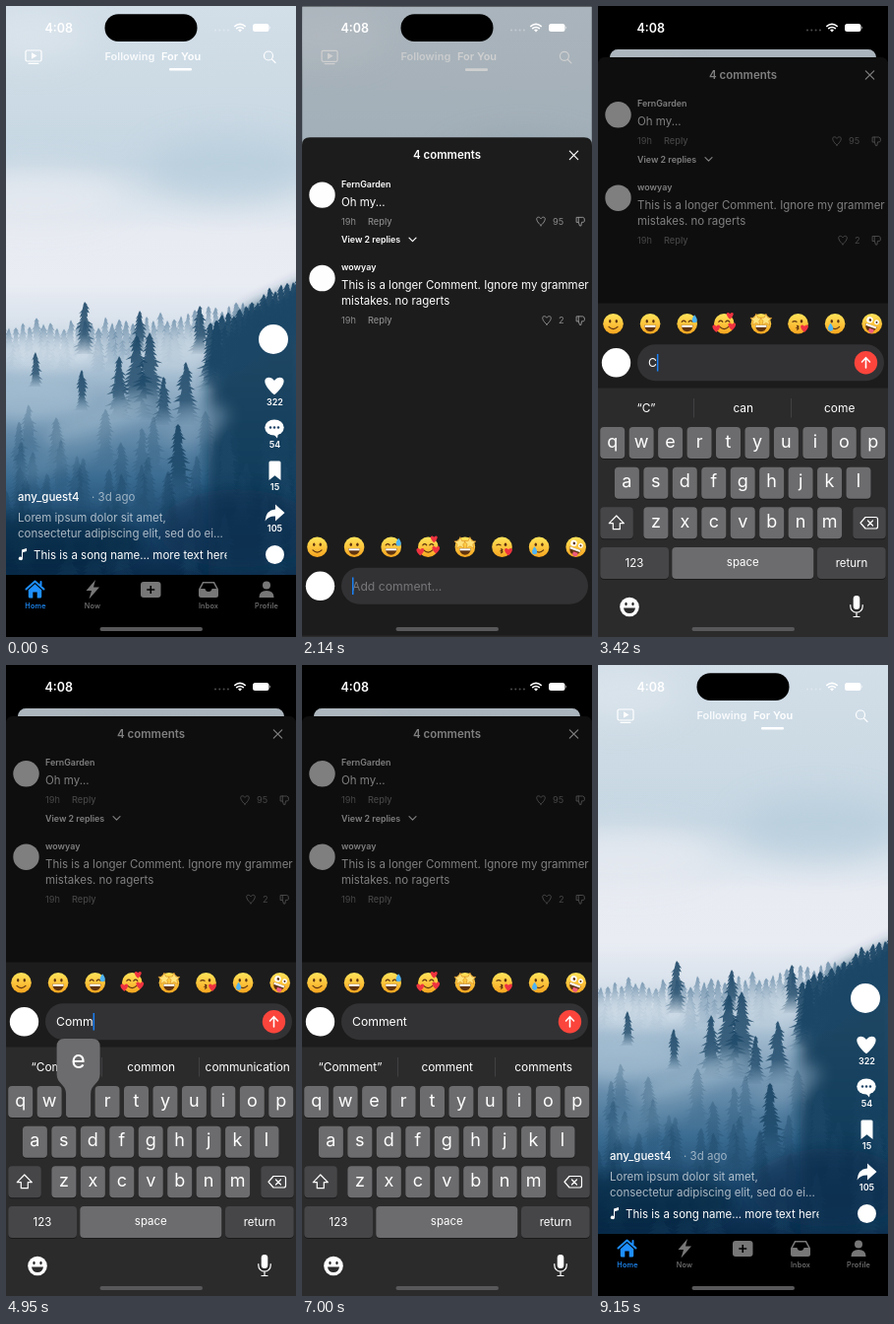
An HTML page for the animation above (9.17 s loop, 295 by 640 pixels).

```html
<!DOCTYPE html>
<html lang="en">
<head>
<meta charset="utf-8">
<title>Comment sheet</title>
<style>
html, body { margin: 0; width: 100%; height: 100%; overflow: hidden; background: #000; }
svg { display: block; width: 100vw; height: 100vh; }
text { font-family: Inter, "Open Sans", sans-serif; font-size: 11.5px; fill: #fff; white-space: pre; }
.b { font-weight: 600; }
.mid { text-anchor: middle; }
.top { font-size: 11px; font-weight: 600; }
.name { font-size: 8.9px; font-weight: 600; }
.meta { font-size: 9.2px; fill: #8a8a8a; }
.count { font-size: 9px; font-weight: 600; text-anchor: middle; }
.tab { font-size: 7.3px; font-weight: 500; letter-spacing: .2px; text-anchor: middle; fill: #777; }
.line { fill: none; stroke: #fff; stroke-width: 1.2; stroke-linecap: round; stroke-linejoin: round; }
.gray { stroke: #9a9a9a; stroke-width: .9; }
.input { font-size: 12.2px; }
.word { font-size: 11.9px; text-anchor: middle; }
.lower { font-size: 18px; text-anchor: middle; }
.upper { font-size: 16px; text-anchor: middle; }
.face { fill: none; stroke: #5f3410; stroke-width: 1.2; stroke-linecap: round; }
.ink { fill: #5f3410; }
</style>
</head>
<body>
<svg viewBox="0 0 295 640" preserveAspectRatio="none">
  <defs>
    <linearGradient id="sky" x2="0" y2="1">
      <stop offset="0" stop-color="#d2dee8"/><stop offset=".12" stop-color="#cddbe5"/>
      <stop offset=".25" stop-color="#c6d7e3"/><stop offset=".31" stop-color="#d9e3ec"/>
      <stop offset=".36" stop-color="#e8ebf2"/><stop offset=".44" stop-color="#e9ecf3"/>
      <stop offset=".5" stop-color="#d9e2ec"/><stop offset=".57" stop-color="#aec4d6"/>
      <stop offset=".66" stop-color="#7195b2"/><stop offset=".75" stop-color="#396a90"/>
      <stop offset=".83" stop-color="#1a466b"/><stop offset=".9" stop-color="#0a2b4b"/>
    </linearGradient>
    <linearGradient id="farTree" x2="0" y2="1">
      <stop offset="0" stop-color="#5b819f"/><stop offset="1" stop-color="#5b819f" stop-opacity="0"/>
    </linearGradient>
    <linearGradient id="nearTree" x2="0" y2="1">
      <stop offset="0" stop-color="#1b4666"/><stop offset=".6" stop-color="#1b4666" stop-opacity=".85"/>
      <stop offset="1" stop-color="#1b4666" stop-opacity="0"/>
    </linearGradient>
    <linearGradient id="skin" x2="0" y2="1">
      <stop offset="0" stop-color="#ffe45a"/><stop offset="1" stop-color="#f8a51f"/>
    </linearGradient>
    <filter id="soft" x="-60%" y="-60%" width="220%" height="220%"><feGaussianBlur stdDeviation="15"/></filter>
    <filter id="haze" x="-60%" y="-60%" width="220%" height="220%"><feGaussianBlur stdDeviation="8"/></filter>
    <clipPath id="card"><rect id="cardShape" width="295" height="640"/></clipPath>
    <clipPath id="songClip"><rect x="12" y="545" width="212.5" height="24"/></clipPath>
    <path id="heart" d="M0 4.2C-5 -.2 -5.3 -4 -2.6 -4.2C-1 -4.3 0 -2.6 0 -2.6S1 -4.3 2.6 -4.2C5.3 -4 5 -.2 0 4.2z"/>
    <path id="thumb" d="M-4-4h6.3q2 .1 1.6 3.7l-.8 1.2H1L.4 4.6H-1L-2.2 1H-4zM-2.2-4v5"/>
  </defs>

  <g id="feed" clip-path="url(#card)">
    <rect width="295" height="640" fill="url(#sky)"/>
    <g filter="url(#soft)">
      <ellipse cx="225" cy="165" rx="80" ry="32" fill="#b7cddc" opacity=".7"/>
      <ellipse cx="30" cy="195" rx="90" ry="28" fill="#e6eaf1" opacity=".8"/>
      <ellipse cx="25" cy="30" rx="60" ry="26" fill="#e0e8ef" opacity=".6"/>
    </g>
    <g id="forest"></g>
    <rect y="577" width="295" height="63"/>
    <path class="line" d="M21.5 45h13q1.5 0 1.5 1.5v8q0 1.500-1.5 1.5h-13q-1.5 0-1.5-1.5v-8q0-1.5 1.5-1.5zM23 58.300h10"/>
    <path d="M26 47.300l5.5 3.200-5.5 3.200z" fill="#fff"/>
    <text class="top" x="100.5" y="55" opacity=".85">Following</text>
    <text class="top" x="158" y="55">For You</text>
    <rect x="166" y="63" width="23" height="2.6" rx="1" fill="#fff"/>
    <path class="line" d="M271.5 50.500a4.5 4.5 0 1 1-9 0a4.5 4.5 0 1 1 9 0M270.400 53.900l3.6 3.6"/>

    <g fill="#fff">
      <circle cx="272" cy="338" r="15"/>
      <use href="#heart" transform="translate(273 385.5) scale(2.25 2.1)"/>
      <ellipse cx="273" cy="427.5" rx="9.7" ry="8"/><path d="M272 434l5-1.500-1 6z"/>
      <path d="M267.5 463q0-1.5 1.5-1.500h9q1.5 0 1.5 1.500v18l-6-4.800-6 4.800z"/>
      <path d="M274 505.500l9.5 8.500-9.5 8.500v-5q-6.500-.5-10.5 5 .8-11.5 10.5-12z"/>
      <circle cx="273.5" cy="556.5" r="9.5"/>
    </g>
    <g fill="#1d4365"><circle cx="269" cy="427.5" r="1.2"/><circle cx="273" cy="427.5" r="1.2"/><circle cx="277" cy="427.5" r="1.2"/></g>
    <text class="count" x="273.5" y="405.3">322</text>
    <text class="count" x="273.5" y="448.3">54</text>
    <text class="count" x="273.5" y="491.3">15</text>
    <text class="count" x="273.5" y="533.3">105</text>
    <text x="12" y="502" font-weight="500">any_guest4</text>
    <text x="87" y="502" opacity=".55">· 3d ago</text>
    <text x="12" y="522.5" opacity=".65">Lorem ipsum dolor sit amet,</text>
    <text x="12" y="538.5" opacity=".65">consectetur adipiscing elit, sed do ei...</text>
    <path d="M16 551.500l5-1.500v3l-4 1.200v6.300a2.100 1.700 0 1 1-1-1.500z" fill="#fff"/>
    <text x="28" y="560.5" clip-path="url(#songClip)">This is a song name... more text here</text>

    <path d="M20.500 591.500l9-8 9 8M35.5 584v4" fill="none" stroke="#1e8fff" stroke-width="2" stroke-linecap="round" stroke-linejoin="round"/>
    <path d="M22.800 592.300l6.700-6 6.700 6v6.700q0 1.500-1.500 1.500h-3v-6h-4.400v6h-3q-1.500 0-1.500-1.500z" fill="#1e8fff"/>
    <g fill="#777">
      <path d="M91 582l-9.5 11h5.5l-2.5 8.500 10.5-12h-6z"/>
      <rect x="137" y="584" width="20.5" height="16" rx="3"/>
      <circle cx="265" cy="587.5" r="4"/><path d="M257.5 600q0-7 7.5-7t7.5 7z"/>
      <path d="M200 584h12l4 7.500v6q0 2.500-2.500 2.500h-15q-2.500 0-2.500-2.500v-6zM201 585.500l-3 5.500h4.500q.5 3 3.500 3t3.500-3h4.500l-3-5.500z" fill-rule="evenodd"/>
    </g>
    <path d="M147.250 588v8m-4-4h8" stroke="#000" stroke-width="1.6"/>
    <text class="tab" x="30" y="610.8" style="fill:#1e8fff">Home</text>
    <text class="tab" x="88" y="610.8">Now</text>
    <text class="tab" x="206" y="610.8">Inbox</text>
    <text class="tab" x="265" y="610.8">Profile</text>
    <rect id="feedDim" width="295" height="640"/>
  </g>

  <rect x="100.5" y="8.3" width="94" height="27.7" rx="13.8"/>
  <text class="b" x="39.5" y="26.5" style="font-size:12.5px">4:08</text>
  <g fill="#fff">
    <g opacity=".3"><circle cx="213" cy="24.5" r="1"/><circle cx="217.3" cy="24.5" r="1"/><circle cx="221.6" cy="24.5" r="1"/><circle cx="225.9" cy="24.5" r="1"/></g>
    <rect x="251" y="18" width="16.5" height="8" rx="2.5"/><path d="M268.5 20.500q1.5 1.500 0 3z"/>
    <path d="M238 26.500l-2-2.200q2-1.500 4 0z"/>
  </g>
  <path class="line" style="stroke-width:1.6;stroke-linecap:butt" d="M232.300 20.800q5.700-4.700 11.400 0M234.200 23q3.800-3 7.600 0"/>

  <g id="sheet">
    <path d="M0 700V8q0-8 8-8h279q8 0 8 8v692z" fill="#1c1c1c"/>
    <text class="b mid" x="147.5" y="22">4 comments</text>
    <path class="line" d="M272.300 13.800l8.400 8.400m0-8.400l-8.400 8.400"/>
    <g fill="#fff"><circle cx="20.5" cy="58.3" r="13.2"/><circle cx="20.5" cy="142.7" r="13.2"/></g>
    <text class="name" x="40" y="50.2">FernGarden</text>
    <text x="40" y="69.2">Oh my...</text>
    <text class="name" x="40" y="106.5">View 2 replies</text>
    <path class="line" d="M109 101.700l3.500 3.500 3.500-3.500"/>
    <text class="name" x="40" y="134.7">wowyay</text>
    <text x="40" y="153.7">This is a longer Comment. Ignore my grammer</text>
    <text x="40" y="169.7">mistakes. no ragerts</text>
    <g id="metas"></g>
    <path id="listDim" d="M0 700V8q0-8 8-8h279q8 0 8 8v692z"/>
  </g>

  <g id="bar">
    <rect y="528" width="295" height="400" fill="#1c1c1c"/>
    <g id="emojis"></g>
    <circle cx="18.5" cy="588.3" r="14.7" fill="#fff"/>
    <rect x="40" y="569.7" width="251" height="37" rx="18.5" fill="#323234"/>
    <text id="hint" class="input" x="51" y="592.5" style="fill:#77777b">Add comment...</text>
    <text id="typed" class="input" x="51" y="592.5"></text>
    <rect id="cursor" y="579.5" width="1.5" height="17.5" fill="#1a80f5"/>
    <g id="send"><circle cx="272.5" cy="588.3" r="11.7" fill="#fb453c"/>
      <path class="line" style="stroke-width:1.6" d="M272.5 593.500v-10m-4 4l4-4.300 4 4.300"/></g>
  </g>

  <g id="keyboard">
    <rect y="387.5" width="295" height="253" fill="#2b2b2c"/>
    <path d="M97.5 398v19.500M196.5 398v19.500" stroke="#48484a" stroke-width=".8"/>
    <text class="word" x="49" y="411.5"></text>
    <text class="word" x="147.7" y="411.5"></text>
    <text class="word" x="245.7" y="411.5"></text>
    <g id="keys"></g>
    <g id="lowerKeys"></g>
    <g id="upperKeys"></g>
    <path id="shift" class="line" d="M18.800 517l7.500 7.700h-4v6h-7v-6h-4z"/>
    <path class="line" d="M272 518.500h10.500q2 0 2 2v7.500q0 2-2 2H272l-5-5.750zM274.500 522l5 5m0-5l-5 5"/>
    <text class="mid" x="37" y="569">123</text>
    <text class="mid" x="147.3" y="568">space</text>
    <text class="mid" x="258" y="569">return</text>
    <circle cx="32" cy="609.5" r="9.8" fill="#fff"/>
    <g fill="#2b2b2c"><ellipse cx="28.5" cy="606.5" rx="1.2" ry="1.8"/><ellipse cx="35.5" cy="606.5" rx="1.2" ry="1.8"/><path d="M26 610.500h12q-1 5.500-6 5.500t-6-5.500z"/></g>
    <rect x="259.7" y="598" width="6.6" height="14" rx="3.3" fill="#fff"/>
    <path class="line" d="M256.800 607.500v1.500a6.200 6.200 0 0 0 12.400 0v-1.500M263 615.500v4m-3 0h6"/>
    <g id="popup">
      <path fill="#6c6c6e" d="M-22-40q0-8 8-8h28q8 0 8 8v28c0 10-9.500 10-9.500 20v20q0 4-4 4h-17q-4 0-4-4v-20c0-10-9.500-10-9.500-20z"/>
      <text id="popupText" class="mid" y="-18" style="font-size:25px"></text>
    </g>
  </g>
  <rect x="95.5" y="630" width="104.5" height="4" rx="2" fill="#58585a"/>
</svg>

<script>
const LOOP = 9170;
const $ = id => document.getElementById(id);
const add = (id, markup) => $(id).insertAdjacentHTML("beforeend", markup);
const show = (id, on) => $(id).setAttribute("display", on ? "inline" : "none");
const shift = (id, x, y, rest = "") => $(id).setAttribute("transform", `translate(${x} ${y}) ${rest}`);

// Misty forest
let seed = 11;
const rand = () => (seed = seed * 16807 % 2147483647) / 2147483647;

function tree(x, top, h, fill, alpha) {
  const rows = Math.max(6, Math.round(h / 4)), left = [], right = [];
  for (let i = 1; i <= rows; i++) {
    const y = top + h * i / rows, w = h * .23 * Math.pow(i / rows, .55);
    const r = w * (.5 + .7 * rand()), l = w * (.5 + .7 * rand());
    right.push(`${x + r} ${y}`, `${x + r * .5} ${y - 1}`);
    left.unshift(`${x - l * .5} ${y - 1}`, `${x - l} ${y + rand()}`);
  }
  add("forest", `<path d="M${x} ${top}L${right.join("L")}L${left.join("L")}z" fill="${fill}" opacity="${alpha}"/>`);
}
function mist(x, y, rx, ry, color, alpha, turn = 0) {
  add("forest", `<ellipse rx="${rx}" ry="${ry}" fill="${color}" opacity="${alpha}" filter="url(#haze)" transform="translate(${x} ${y}) rotate(${turn})"/>`);
}
const far = "url(#farTree)", near = "url(#nearTree)";
for (let x = -4; x < 300; x += 7) tree(x, 314 - 30 * (x / 295) ** 3 + 14 * rand(), 34 + 14 * rand(), far, .75);
add("forest", '<path d="M206 577V385Q218 335 248 308L310 278V577z" fill="#103857" opacity=".9" filter="url(#haze)"/>');
mist(40, 350, 60, 16, "#dbe5ee", .7);
mist(172, 348, 32, 18, "#c6d5e1", .7);
for (let x = 208; x < 300; x += 6) tree(x, 318 - 48 * (x - 208) / 87 + 10 * rand(), 70, near, .95);
mist(25, 400, 60, 22, "#a9c2d5", .6);
[[80, 300, 54], [136, 309, 44], [30, 351, 36], [214, 319, 70], [197, 304, 50], [115, 355, 66], [133, 334, 85],
 [146, 331, 90], [77, 369, 42], [183, 361, 65], [160, 376, 50]].forEach(([x, y, h]) => tree(x, y, h, near, .9));
mist(195, 425, 34, 16, "#7f9fb8", .55, -25);
mist(95, 420, 60, 13, "#9cb8cc", .65, -20);
for (let i = 0; i < 60; i++) {
  const d = i / 60;
  tree(rand() * 300, 400 + 125 * d + 20 * rand(), 60, near, .25 + .3 * d);
}
tree(175, 424, 80, near, .95);
tree(225, 430, 80, near, .95);
mist(60, 455, 55, 12, "#6f95b1", .45, -25);
mist(30, 545, 110, 30, "#06203a", .55);
mist(235, 530, 80, 40, "#0a2b4b", .5);

// Comment footers
[[85, 243, "95"], [185.5, 249, "2"]].forEach(([y, x, likes]) => add("metas", `
  <text class="meta" x="40" y="${y + 3.3}">19h</text><text class="meta" x="67" y="${y + 3.3}" font-weight="500">Reply</text>
  <use href="#heart" class="line gray" transform="translate(${x} ${y})"/>
  <text class="meta" x="${x + 12}" y="${y + 3.3}">${likes}</text>
  <use href="#thumb" class="line gray" transform="translate(283.5 ${y})"/>`));

// Emoji row
const eyes = '<ellipse class="ink" cx="-3.3" cy="-2.5" rx="1.2" ry="1.8"/><ellipse class="ink" cx="3.3" cy="-2.5" rx="1.2" ry="1.8"/>';
const shutEyes = '<path class="face" d="M-5.500-2q2-2.500 4 0M1.500-2q2-2.500 4 0"/>';
const smile = '<path class="face" d="M-4.500 3q4.500 4.500 9 0"/>';
const grin = '<path class="ink" d="M-6 1.500h12q-1 6.500-6 6.500t-6-6.500z"/><path d="M-5.500 1.500h11v2h-11z" fill="#fff"/>';
const love = (x, y, s) => `<use href="#heart" fill="#ef3340" transform="translate(${x} ${y}) scale(${s})"/>`;
const star = x => `<path transform="translate(${x} -4) scale(1.25)" fill="#ffe27a" stroke="#d98a1c" stroke-width=".5" d="M0-5l1.400 3.200 3.400.3-2.500 2.300.8 3.500L0 2.500l-3.100 1.800.8-3.500-2.500-2.300 3.400-.3z"/>`;
const drop = (x, y) => `<path transform="translate(${x} ${y})" fill="#4fb4f2" d="M0-4q3 4 2.500 5.500a2.500 2.500 0 0 1-5 0Q-3 0 0-4z"/>`;
[
  eyes + smile,
  eyes + grin,
  shutEyes + grin + drop(7.5, -5),
  shutEyes + smile + love(-8, 5, .9) + love(8, 3, .9) + love(6, -8, .8),
  star(-5) + star(5) + grin,
  '<path class="face" d="M-5.500-2q2-1.500 4 0M-1 2q3 .5 0 2 3 .5 0 2"/><ellipse class="ink" cx="3.5" cy="-2.5" rx="1.3" ry="1.8"/>' + love(6.5, 5, .9),
  eyes + smile + drop(-4.5, 3.5),
  '<g transform="rotate(20)"><circle cx="-3.5" cy="-3" r="3.2" fill="#fff"/><circle cx="4" cy="-3" r="2.4" fill="#fff"/><circle class="ink" cx="-3" cy="-3" r="1.3"/><circle class="ink" cx="4" cy="-3" r="1"/>' + grin + '<path d="M-1 5h5v3q-2.500 3-5 0z" fill="#ee5b7c"/></g>'
].forEach((face, i) => add("emojis",
  `<g transform="translate(${15.5 + 37.6 * i} 548.8)"><circle r="10.3" fill="url(#skin)"/>${face}</g>`));

// Keyboard
const keyPos = {};
const key = (x, y, w, fill, id = "") => add("keys",
  `<rect x="${x}" y="${y + 1}" width="${w}" height="32" rx="4" fill="#1b1b1c"/><rect id="${id}" x="${x}" y="${y}" width="${w}" height="32" rx="4" fill="${fill}"/>`);
[["qwertyuiop", 14.7, 427], ["asdfghjkl", 29.4, 467.7], ["zxcvbnm", 58.9, 508.3]].forEach(([row, start, y]) =>
  [...row].forEach((c, i) => {
    const x = start + 29.45 * i;
    keyPos[c] = [x, y];
    key(x - 12.5, y, 25, "#6c6c6e");
    add("lowerKeys", `<text class="lower" x="${x}" y="${y + 20.7}">${c}</text>`);
    add("upperKeys", `<text class="upper" x="${x}" y="${y + 21.8}">${c.toUpperCase()}</text>`);
  }));
key(2.3, 508.3, 33.5, "#464648", "shiftKey");
key(259.3, 508.3, 33.5, "#464648");
key(2.3, 549, 69.7, "#464648");
key(75.3, 549, 144, "#6c6c6e");
key(223, 549, 69.7, "#464648");

// Each press: letter, finger down, finger up (ms)
const presses = [["C", 3060, 3200], ["o", 3540, 3650], ["m", 3990, 4120], ["m", 4480, 4600],
  ["e", 4840, 5060], ["n", 5660, 5780], ["t", 6350, 6470]];
const guesses = [["I", "The", "I’m"], ["can", "come"], ["could", "come"], ["come", "coming"],
  ["common", "communication"], ["comment", "comments"]];
const words = document.querySelectorAll(".word");

// Remaining share (1 to 0) of a critically damped spring, held between steps
function remaining(t, from, to, step, lead, speed, gap = step) {
  if (t < from) return 1;
  if (t >= to - 5) return 0;
  const past = t - from - gap + 8;
  const held = past < 0 ? 0 : gap + Math.floor(past / step) * step;
  const x = speed * (lead + held) / 1000;
  return (1 + x) * Math.exp(-x);
}

function render(t) {
  const away = t < 8610 ? remaining(t, 1070, 1610, 108, 36, 14) : 1 - remaining(t, 8610, 9150, 108, 40, 12);
  const low = t < 7170 ? remaining(t, 2140, 2920, 105, 15, 8.65, 150) : 1 - remaining(t, 7170, 7720, 110, 40, 12);
  const up = 1 - low, slide = 506 * away;

  shift("feed", 12 * up, 44 * up, `scale(${1 - 24 / 295 * up})`);
  $("cardShape").setAttribute("rx", 9 * up);
  $("feedDim").setAttribute("opacity", .19 * (1 - away));
  shift("sheet", 0, 52 + 82 * low + slide);
  $("listDim").setAttribute("opacity", .5 * Math.min(1, 1.2 * up));
  shift("bar", 0, slide - 226.5 + Math.min(226.5, 265 * low));
  shift("keyboard", 0, 253 * low);
  show("sheet", away < 1);
  show("bar", away < 1);
  show("keyboard", low < 1);

  const done = presses.filter(p => t >= p[2]);
  const text = done.map(p => p[0]).join("");
  $("typed").textContent = text;
  show("hint", !text);
  show("send", text);
  const lastTouch = done.length ? done[done.length - 1][2] : 2140;
  $("cursor").setAttribute("x", 51 + (text ? $("typed").getComputedTextLength() : 0));
  show("cursor", t >= 2140 && t < 7170 && (t - lastTouch) % 1000 < 500);

  const options = guesses[Math.min(text.length, guesses.length - 1)];
  (text ? [`“${text}”`, ...options] : options).forEach((w, i) => words[i].textContent = w);
  show("upperKeys", !text);
  show("lowerKeys", text);
  $("shiftKey").setAttribute("fill", text ? "#464648" : "#e4e4e6");
  $("shift").style.fill = text ? "none" : "#000";
  $("shift").style.stroke = text ? "#fff" : "#000";

  const held = presses.find(p => t >= p[1] && t < p[2]);
  show("popup", held);
  if (held) {
    shift("popup", ...keyPos[held[0].toLowerCase()]);
    $("popupText").textContent = held[0];
  }
}

function frame(now) {
  render(now % LOOP);
  requestAnimationFrame(frame);
}
render(0);
requestAnimationFrame(frame);
</script>
</body>
</html>
```
